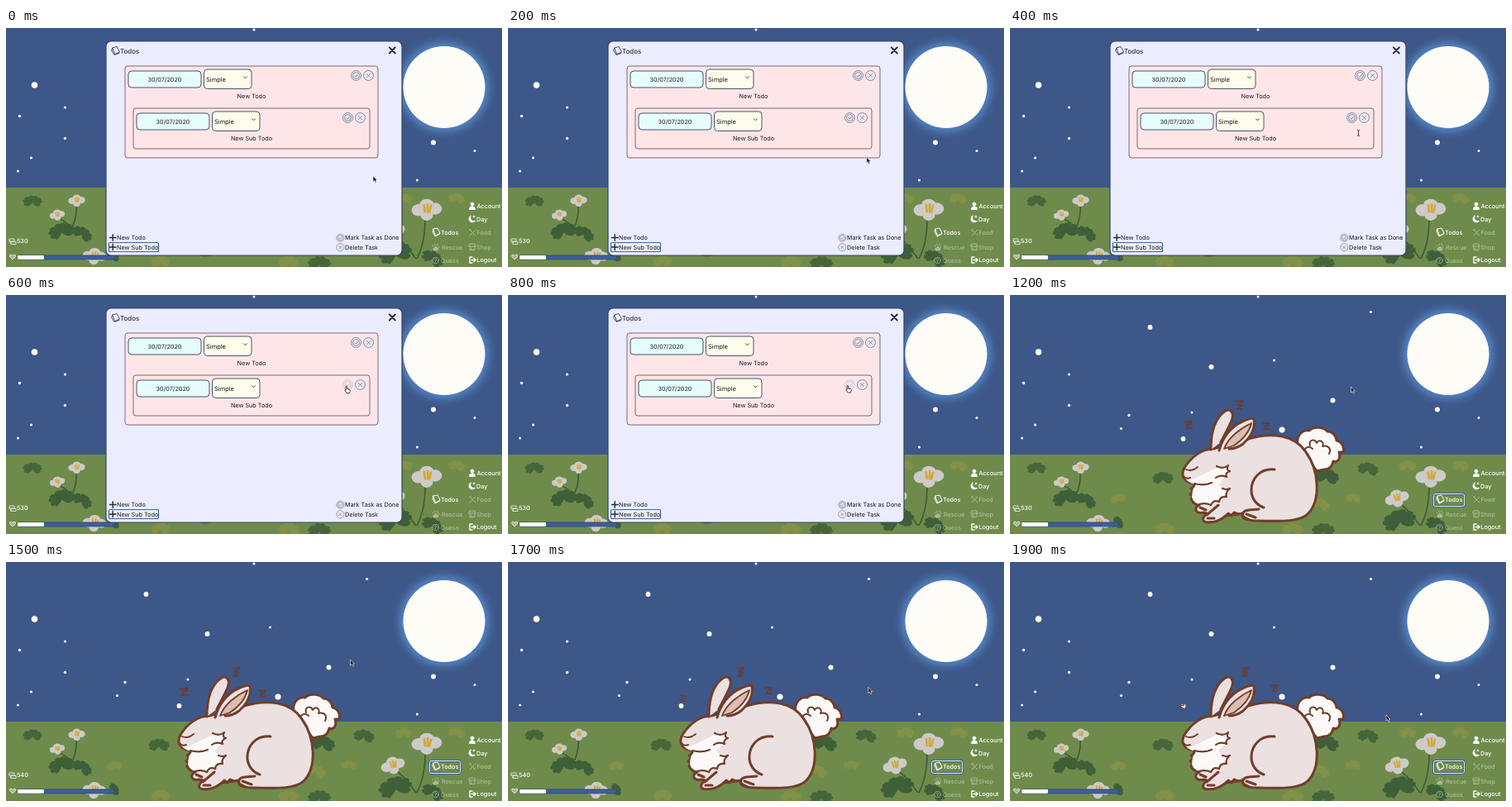
Write an HTML page that moves like this. It is 600 px wide and 289 px high and loops after 2000 ms.

```html
<!DOCTYPE html>
<html lang="en">
<head>
<meta charset="utf-8">
<title>Bunny todos</title>
<style>
html, body { margin: 0; width: 100%; height: 100%; overflow: hidden; background: #3d5788; }
svg { display: block; width: 100vw; height: 100vh; }
text { font: 7.25px Inter, "Liberation Sans", sans-serif; fill: #17181f; text-rendering: geometricPrecision; }
.nav text, .hud text { fill: #fff; font-weight: 500; }
.nav { fill: none; stroke: #fff; stroke-width: 1; stroke-linecap: round; stroke-linejoin: round; }
.nav text { stroke: none; }
.solid { fill: #fff; }
.dim { opacity: .42; }
.fur { fill: #ebe1e0; stroke: #723d2b; stroke-width: 3; stroke-linejoin: round; stroke-linecap: round; }
.line { fill: none; }
.white { fill: #fcfaf8; }
.z { fill: none; stroke: #663e3b; stroke-width: 1.8; stroke-linejoin: round; stroke-linecap: round; }
.round { fill: #ecebf6; stroke: #6e7080; stroke-width: .8; }
.field { stroke: #4c5568; stroke-width: 1; }
.card { fill: #fee6e8; stroke: #746a7c; stroke-width: 1; }
.ink { fill: none; stroke: #20273c; stroke-width: 1.4; stroke-linecap: round; }
</style>
</head>
<body>
<svg viewBox="0 0 600 289" preserveAspectRatio="none">
  <defs>
    <radialGradient id="glow">
      <stop offset=".73" stop-color="#5585c4"/>
      <stop offset=".82" stop-color="#4f7cb9" stop-opacity=".75"/>
      <stop offset="1" stop-color="#3d5788" stop-opacity="0"/>
    </radialGradient>
  </defs>
  <rect width="600" height="289" fill="#3d5788"/>
  <circle cx="530" cy="71.5" r="65" fill="url(#glow)"/>
  <circle cx="530" cy="71.5" r="49.5" fill="#fdfcf6"/>
  <g id="stars" fill="#fdfdf8"></g>
  <rect y="193" width="600" height="96" fill="#6f8b4b"/>
  <g id="plants"></g>

  <g class="fur">
    <path class="white" d="M348 181C346 170 354 162 362 164C368 158 380 160 384 165C391 165 395 172 395 176C401 177 405 184 403 190L398 190Q401 199 394 202L391 201Q389 211 380 211L371 213Z"/>
    <path class="line" style="stroke-width:2" d="M363 182C361 175 369 173 371 179C374 173 381 178 378 183C385 181 389 186 386 192M356 187Q361 181 366 186"/>
    <path d="M246 186C232 186 219 196 211 209C206 218 210 226 223 228Q224 231 219 234Q223 236 218 241Q222 243 219 247Q222 253 229 254C221 258 225 265 234 263L238 264C234 268 231 273 237 274.5C246 276 255 272 261 267L282 264C279 270 286 273 300 273C330 274 352 274 361 264C376 248 374 212 358 190C345 170 318 165 288 174Z"/>
    <path class="white" stroke="none" d="M212 222C220 227 233 216 248 210L264 207L261 219L252 229L262 238L252 249L240 255L226 252L220 245L221 236L226 229Q217 228 212 222Z"/>
    <path class="line" style="stroke-width:2.2" d="M250 207Q258 211 264 206Q261 212 266 213Q260 215 262 220Q254 217 249 221M223 228Q235 231 244 227M257 234Q263 236 266 234Q260 239 262 244Q254 243 253 250Q246 247 243 254Q237 251 229 253"/>
    <path class="line" style="stroke-width:1.9" d="M213 211Q220 214 227 208M210 219Q213 223 218 221"/>
    <path class="line" d="M320 211C303 209 291 222 292 238C293 248 300 255 307 257M301 259L289 260C281 261 279 266 284 269L290 272M286 265L297 269M252 254L238 266M239 270L247 270M230 257L237 260M261 267L264 264L268 267L271 263L276 265"/>
    <path d="M243 187C243 169 247 151 258 142C266 135 272 142 268 152C263 163 259 170 255 178"/>
    <path d="M253 188C257 173 267 159 281 153Q292 148 295 150C297 161 292 171 282 180Q274 186 265 186"/>
    <path d="M259 186C264 172 279 161 292 155C289 168 280 176 271 182Z" fill="#dcbdb1" style="stroke-width:1.8"/>
  </g>
  <g class="z">
    <path id="z0" d="M-5-3.5L4-4.5L-3.5 4L4.5 3.5M-3-.5L3.5-.8"/>
    <path id="z1" d="M-4-4.5L4-5L-2.5 0L3 .2L-3.5 5L2 4.5"/>
    <path id="z2" d="M-4-3.5L3.5-4L-3 3.5L3.5 3M-2-.3L2.5-.6"/>
  </g>

  <g class="hud">
    <g fill="none" stroke="#fff" stroke-width=".9" opacity=".8">
      <path d="M4 255H10V258H4ZM6 258.5H12V261.5H6ZM4 257L6 261"/>
      <path d="M8 280L4.5 276.5Q4 273.5 6.5 274L8 275.5L9.5 274Q12 273.5 11.5 276.5Z" fill="#b9c4ab"/>
    </g>
    <text id="coins" x="13" y="260.2">530</text>
    <rect x="14" y="275" width="117.5" height="4.8" rx="1" fill="#3d5da0" stroke="#314a72"/>
    <rect x="14" y="275" width="32" height="4.8" rx="1" fill="#fff"/>
  </g>
  <g class="nav">
    <g id="focus">
      <rect x="512.5" y="240.5" width="37" height="15" rx="2" stroke="#3a5f9c" stroke-width="2.4"/>
      <rect x="512.5" y="240.5" width="37" height="15" rx="2" stroke="#e4ebf6"/>
    </g>
    <g class="solid"><circle cx="564" cy="213" r="1.9"/><path d="M560.5 219Q560.5 215.8 564 215.8Q567.5 215.8 567.5 219Z"/><text x="569.5" y="217.6">Account</text></g>
    <g><path class="solid" d="M562 227Q560 234 567.5 233.5Q562 237 560 231.5Q560 228 562 227Z"/><path d="M566 227V229M565 228H567"/><text x="569" y="233.6">Day</text></g>
    <g><path d="M517 243L522 242L525 248L520 251ZM517 243L516 246L519 252L525 249"/><text x="526" y="250.4">Todos</text></g>
    <g class="dim"><path d="M561 244L568 251M568 244L561 251M560.5 245L562.5 243"/><text x="569.5" y="250.4">Food</text></g>
    <g class="dim"><path class="solid" d="M517 267Q520 262 523 267Q523 270 520 268.5Q517 270 517 267Z"/><path d="M516.5 263V264M519 261V263M522 261V263M523.5 264V265"/><text x="527" y="267.6">Rescue</text></g>
    <g class="dim"><path d="M561 261H567L568 264H560ZM561 264V268.5H567V264M563 268V266"/><text x="569" y="267.6">Shop</text></g>
    <g class="dim"><circle cx="519.5" cy="281" r="3.7"/><path d="M518 280Q519.5 277.5 521 280L519.5 281.5V282.7"/><text x="526" y="283.6">Guess</text></g>
    <g><path d="M564 277H561V284H564M563 280.5H568M566 278.5L568 280.5L566 282.5" stroke-width="1.4"/><text x="569.3" y="283.4">Logout</text></g>
  </g>

  <g id="modal">
    <rect x="121" y="16" width="358" height="259" rx="6" fill="#ebedfe" stroke="#32456d" stroke-width="1.2"/>
    <path class="ink" style="stroke-width:.8" d="M129 24L134 22.5L137.5 29L132 31.5ZM129 24L127.5 27L131 32.5L137 30.5"/>
    <text x="138" y="30.8" style="font-size:8px">Todos</text>
    <path class="ink" style="stroke-width:1.8" d="M463.8 23.5L470.8 30.5M470.8 23.5L463.8 30.5"/>
    <rect class="card" x="144" y="46" width="306" height="111" rx="3"/>
    <rect class="card" x="154" y="97" width="286" height="49" rx="3"/>
    <g id="tasks"></g>
    <path class="ink" d="M125.5 253.5H133M129.2 249.8V257.2M125.5 265H133M129.2 261.3V268.7"/>
    <text x="134" y="256.2">New Todo</text>
    <text x="134" y="267.6">New Sub Todo</text>
    <rect x="124.5" y="259.5" width="60" height="11" rx="1" fill="none" stroke="#3d6799" stroke-width="1.2"/>
    <g id="legend"></g>
    <text x="410" y="256.2">Mark Task as Done</text>
    <text x="410" y="267.6">Delete Task</text>
  </g>

  <g id="cursor">
    <path id="arrow" d="M0 0V7L1.6 5.6L2.8 8.2L4.1 7.6L3 5.1L5 5Z" fill="#15161c" stroke="#fff" stroke-width=".6"/>
    <path id="beam" d="M-1.5-3.5Q0-3.5 0-2.3Q0-3.5 1.5-3.5M0-2.5V2.5M-1.5 3.5Q0 3.5 0 2.3Q0 3.5 1.5 3.5" fill="none" stroke="#30313a" stroke-width=".9"/>
    <path id="hand" d="M-1 0Q0-1 .6 0V3L3.6 3.6Q4.6 4 4.2 6L3.4 8H.2L-2 5Q-2 3.8-.8 4.6Z" fill="#fff" stroke="#15161c" stroke-width=".8"/>
  </g>
</svg>
<script>
const $ = id => document.getElementById(id);
const LOOP = 2000, CLOSE_AT = 1200, PAID_AT = 1400;

const stars = [
  [300, 2, 1.5], [169.5, 39, 2.9], [34.5, 69, 3.8], [436.5, 20.5, 1.6], [243.5, 87, 3],
  [319.5, 79, 1.6], [16.5, 106.5, 1.7], [71.5, 96, 1.6], [71.5, 133.5, 1.7], [30.5, 157, 1.6],
  [14.5, 173, 1.5], [144, 145.5, 1.7], [134.5, 161.5, 1.6], [220, 142, 1.5], [209.5, 174, 2.9],
  [329, 163, 3.6], [390.5, 127.5, 3], [517, 138.5, 3], [567, 148.5, 1.5], [497.5, 184, 1.6]
];
$('stars').innerHTML = stars.map(([x, y, r]) => `<circle cx="${x}" cy="${y}" r="${r}"/>`).join('');

const DARK = '#46663a', LEAF = '#3e5f38', OLIVE = '#829148', PETAL = '#cdcac8';
const place = (x, y, scale, turn, body) =>
  `<g transform="translate(${x} ${y}) rotate(${turn}) scale(${scale})">${body}</g>`;

// A flattened clover: heart-shaped lobes around its middle
function clover(x, y, scale, color, turn = 0) {
  const lobe = a => `<path transform="rotate(${a})" d="M0 0C-6-3-6-9-2.5-9Q0-9 0-7Q0-9 2.5-9C6-9 6-3 0 0Z"/>`;
  return place(x, y, scale, turn,
    `<g fill="${color}" transform="scale(1.25 .8)">${[-100, -30, 40, 110].map(lobe).join('')}<path d="M0 0Q-2 4-5 7" fill="none" stroke="${color}" stroke-width="1.6"/></g>`);
}

function flower(x, y, scale, turn = 0) {
  return place(x, y, scale, turn,
    `<g fill="${PETAL}"><ellipse cx="-5.5" cy="1" rx="4.7" ry="4"/><ellipse cx="5.5" cy="0" rx="4.7" ry="4"/>
     <ellipse cx="0" cy="-2.5" rx="5" ry="4"/><ellipse cx="0" cy="4" rx="4.2" ry="4"/></g>
     <path d="M-1.8-2.5L-1.2 2M.6-3V2.2M2.8-2.2L1.8 2.2" stroke="#d2aa35" stroke-width="1.5" stroke-linecap="round"/>`);
}

$('plants').innerHTML = [
  clover(32, 210, 1, DARK), clover(185, 222, 1.1, DARK), clover(433, 211, 1.1, DARK, 10),
  clover(383, 220, 1.3, LEAF, 10), clover(379, 285, 1.2, DARK),
  clover(131, 247, .8, OLIVE, -10), clover(187, 283, 1, OLIVE), clover(375, 253, 1, OLIVE, 20),
  clover(342, 284, 1.1, OLIVE), clover(415, 246, .8, OLIVE),
  clover(481, 207, .9, OLIVE), clover(545, 207, .9, OLIVE, 10),
  `<path d="M85 214Q86 230 79 243M65 231Q74 234 79 243M507 233Q507 260 497 279M472 252Q484 262 496 279" fill="none" stroke="${LEAF}" stroke-width="1.7"/>`,
  clover(67, 246, 1.35, LEAF, -15), clover(92, 249, 1.1, LEAF, 30),
  clover(471, 273, 1.75, LEAF, -15), clover(516, 279, 1.2, LEAF, 30), clover(131, 275, .7, LEAF, 60),
  flower(62, 225.5, .9, -8), flower(85.5, 208, 1), flower(107, 275, 1.4, 8),
  flower(509, 218.5, 1.8), flower(468, 245, 1.45, -12)
].join('');

function badge(x, y, r, mark, id = '') {
  const k = r / 6;
  const sign = mark === 'done'
    ? '<circle r="4" fill="none"/><path d="M-2 .2L-.5 1.8L2.3-1.5" fill="none"/>'
    : '<path d="M-2.3-2.3L2.3 2.3M2.3-2.3L-2.3 2.3"/>';
  return `<g ${id && `id="${id}"`} class="round" transform="translate(${x} ${y}) scale(${k})"><circle r="6"/>${sign}</g>`;
}

function task(x, y, right, label, doneId) {
  return `<rect class="field" x="${x}" y="${y}" width="88" height="20" rx="4" fill="#e6fdfe"/>
    <text x="${x + 44}" y="${y + 12.7}" text-anchor="middle">30/07/2020</text>
    <rect class="field" x="${x + 91.5}" y="${y - 2}" width="57.5" height="23.5" rx="4" fill="#fefdec"/>
    <text x="${x + 94}" y="${y + 12.7}" style="font-size:7.5px">Simple</text>
    <path class="ink" style="stroke-width:.9" d="M${x + 139.5} ${y + 6.8}l2 2l2-2"/>
    <text x="297" y="${y + 32.5}" text-anchor="middle">${label}</text>` +
    badge(right, y + 5.5, 6, 'done', doneId) + badge(right + 15, y + 5.5, 6, 'delete');
}
$('tasks').innerHTML = task(148, 52, 423.5, 'New Todo') + task(158, 103, 413.5, 'New Sub Todo', 'subDone');
$('legend').innerHTML = badge(404.3, 253.7, 4.6, 'done') + badge(404.3, 265.2, 4.6, 'delete');

// Each row: time, x, y
const cursorPath = [
  [0, 444, 179], [100, 440, 171], [400, 421.5, 127], [600, 412, 110.5], [800, 411, 110],
  [1000, 412.5, 111], [1200, 412.5, 111], [1500, 416.5, 118], [1900, 455, 185]
];
const zPaths = [
  [[1200, 216, 157], [1500, 216, 157], [1900, 208, 173.5]],
  [[1200, 278, 133], [1500, 278.5, 133], [1900, 284.5, 133]],
  [[1200, 310, 159], [1500, 310.5, 159], [1900, 320, 153]]
];

function at(path, t) {
  if (t <= path[0][0]) return path[0].slice(1);
  const i = path.findIndex(p => p[0] > t);
  if (i < 0) return path[path.length - 1].slice(1);
  const [a, b] = [path[i - 1], path[i]];
  const k = (t - a[0]) / (b[0] - a[0]);
  return [1, 2].map(n => a[n] + (b[n] - a[n]) * k);
}

const show = (id, on) => { $(id).style.display = on ? '' : 'none'; };

function render(now) {
  const t = Math.floor(now % LOOP / 100) * 100;
  const open = t < CLOSE_AT;
  show('modal', open);
  show('focus', !open);
  $('coins').textContent = t < PAID_AT ? '530' : '540';

  const pointer = t >= 300 && t < 600 ? 'beam' : t >= 600 && t < 1000 ? 'hand' : 'arrow';
  for (const id of ['arrow', 'beam', 'hand']) show(id, id === pointer);
  $('cursor').setAttribute('transform', `translate(${at(cursorPath, t)})`);
  $('subDone').style.opacity = t >= 600 && open ? .35 : 1;

  const drift = Math.max(0, (t - 1500) / 400);
  zPaths.forEach((path, i) => {
    const shape = i ? '' : ` rotate(${25 * drift}) scale(${1 - .4 * drift})`;
    $('z' + i).setAttribute('transform', `translate(${at(path, t)})${shape}`);
  });
}

const start = performance.now();
function tick() {
  render(performance.now() - start);
  requestAnimationFrame(tick);
}
tick();
</script>
</body>
</html>
```
